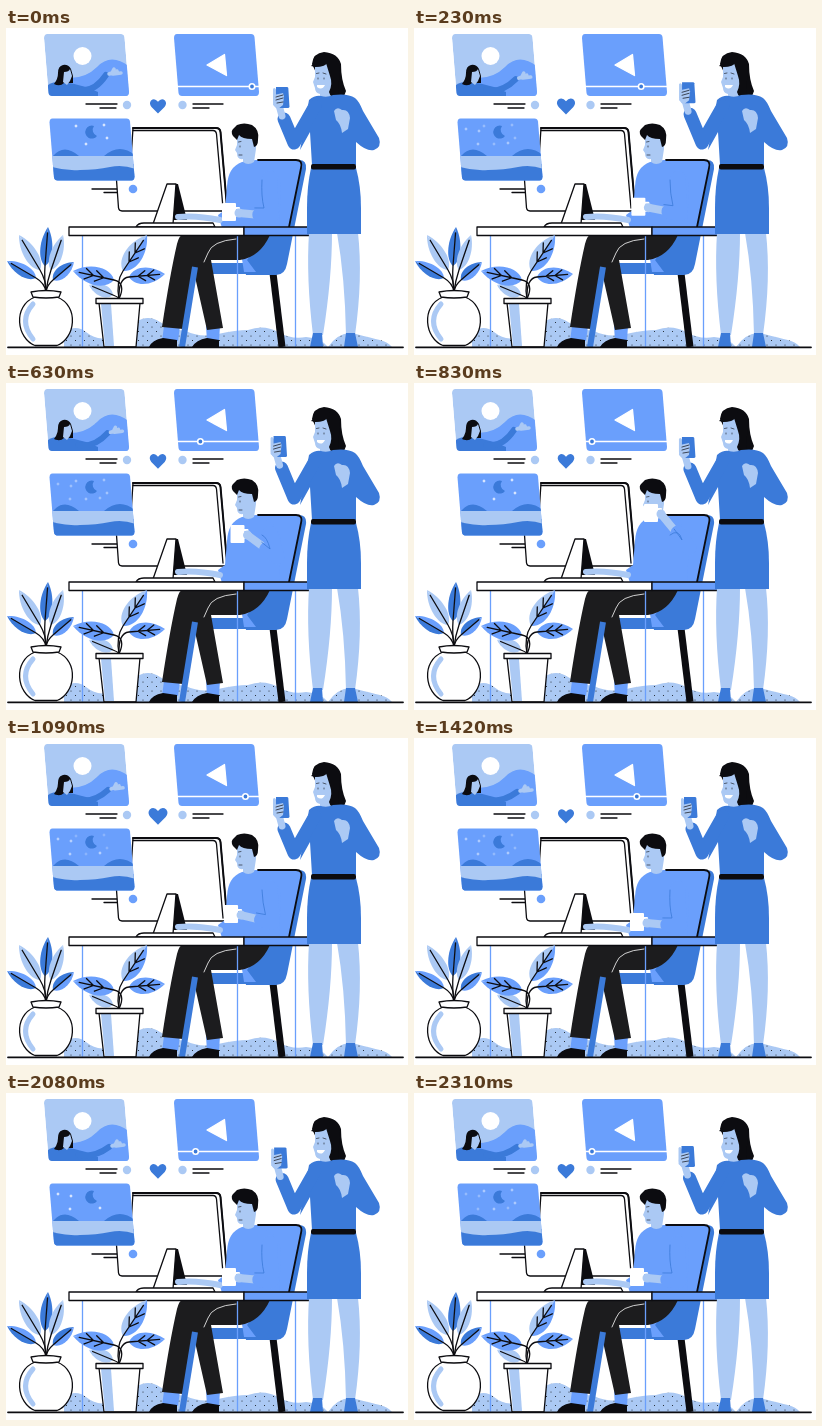
An HTML page that plays this animation: 402 by 327 pixels, repeating every 2.41 s.

```html
<!DOCTYPE html>
<html lang="en">
<head>
<meta charset="utf-8">
<title>Video call at the desk</title>
<style>
  html, body { margin: 0; width: 100%; height: 100%; overflow: hidden; background: #fff; }
  svg { display: block; width: 100vw; height: 100vh; stroke-width: 1.3; stroke-linecap: round; stroke-linejoin: round; }
  .l { fill: #abc9f4; }
  .m { fill: #6a9ffc; }
  .d { fill: #3b7ad9; }
  .k { fill: #0c0c10; }
  .w { fill: #fff; }
  .ink { fill: none; stroke: #0c0c10; }
  .box { fill: #fff; stroke: #0c0c10; }
  .desk { fill: #6a9ffc; stroke: #0c0c10; }
  .sl, .sm, .sd { fill: none; stroke: #abc9f4; }
  .sm { stroke: #6a9ffc; }
  .sd { stroke: #3b7ad9; }
</style>
</head>
<body>
<svg viewBox="0 0 402 327" preserveAspectRatio="none">
  <defs>
    <pattern id="dots" width="9" height="9" patternUnits="userSpaceOnUse">
      <circle cx="2" cy="2" r=".5"/><circle cx="6.500" cy="6.500" r=".5"/>
    </pattern>
    <path id="mounds" d="M58 319V304Q70 296 80 304T100 310L130 294Q142 286 154 294T180 303Q194 310 212 306T242 302Q258 296 272 304T300 309Q315 310 322 319ZM322 319Q334 302 350 306T374 312T386 319Z"/>
    <path id="card" d="M41 6H115Q118 6 118.500 9L123 64Q123 68 120 68H46Q43 68 42.500 65L38 10Q38 6 41 6Z"/>
    <clipPath id="clip"><use href="#card"/></clipPath>
    <clipPath id="clipLow"><use href="#card" transform="translate(5.500 84.500)"/></clipPath>
  </defs>

  <use href="#mounds" class="l"/>
  <use href="#mounds" fill="url(#dots)"/>

  <!-- portrait card -->
  <g clip-path="url(#clip)">
    <use href="#card" class="l"/>
    <circle class="w" cx="76.500" cy="28" r="9"/>
    <path class="m" d="M64 68V50Q80 50 91 39Q105 24 124 39V68Z"/>
    <path class="d" d="M40 68L42 57Q48 53 58 54Q70 56 80 59L92 64V68Z"/>
    <path class="sd" id="waveArm" stroke-width="6"/>
    <path class="sl" id="waveHand" stroke-width="3.500"/>
    <path class="k" d="M65 41Q62 36 57 37Q52 38 52 45Q52 51 48 56Q54 59 58 55H67V48Z"/>
    <path class="l" d="M58 44Q63 44 64 41L66 48L64 53L61 57L57 54Z"/>
  </g>

  <!-- player card -->
  <use href="#card" class="m" x="130"/>
  <path class="w" stroke="#fff" d="M201 37L218.500 26.500L220.500 47.500Z"/>
  <path stroke="#fff" d="M171.500 58.500H253"/>
  <circle id="knob" class="d" cy="58.500" r="2.700" stroke="#fff" stroke-width="1.600"/>

  <!-- captions -->
  <path class="ink" d="M80 76H111M94 80H110M187 76H217M187 80H203M86 161H117M98 164.500H117"/>
  <circle class="l" cx="121" cy="77" r="4.200"/>
  <circle class="l" cx="176.500" cy="77" r="4.200"/>
  <path class="d" id="heart" d="M0 8L-7 1Q-10 -3 -7.500 -6Q-3.500 -9 0 -4.500Q3.500 -9 7.500 -6Q10 -3 7 1Z"/>

  <!-- chair -->
  <path class="ink" stroke-width="7" stroke-linecap="butt" d="M267 245L276 319"/>
  <path class="d" d="M179 235H245V246H180Z"/>
  <path class="d" d="M250 132H293Q301 132 300 141L281 236Q279 247 270 247H240L232 205Z"/>
  <path class="m" d="M250 132H290Q297 132 295 140L283 199H250ZM232 205H262L241 232L250 244H238Z"/>
  <path class="ink" stroke-width="1.800" d="M252 132H290Q297 132 295 140L283 199"/>

  <!-- computer -->
  <path class="box" d="M127 100H210Q214 100 214.500 104L221 179Q221 183 217 183H116Q113 183 112.500 180L110 145L124 146Z"/>
  <path class="ink" stroke-width="2" d="M127 100H210Q214 100 214.500 104L221 179"/>
  <path class="ink" d="M127 102.500H207Q210 102.500 210.500 106L217 180"/>
  <path class="k" d="M169 156H172L181 192H166Z"/>
  <path class="box" d="M161 156H170L167 196H147Z"/>

  <!-- moonlit card -->
  <g clip-path="url(#clipLow)">
    <path class="m" d="M40 88H135V155H40Z"/>
    <path class="d" d="M47 128Q58 115 73 128ZM98 128Q114 114 130 128ZM46 136H135V155H46Z"/>
    <path class="l" d="M46 128H132V142Q118 136 104 139T74 142Q60 143 46 139Z"/>
    <path class="d" d="M88 98A6.500 6.500 0 1 0 91 108A6.500 6.500 0 0 1 88 98Z"/>
    <g id="stars" class="w"></g>
  </g>
  <circle class="m" cx="127" cy="161" r="4.300"/>

  <!-- seated man -->
  <path class="m" d="M236 134Q222 139 221 158L219 182L212 187L216 200H273L275 160Q274 143 262 138L250 132Z"/>
  <path class="sl" stroke-width="6" d="M172 189Q190 187 214 192"/>
  <path class="l" d="M231 106H250V121L248 134Q242 138 237 134V131Q231 132 231 125L229 122L231 117Z"/>
  <path class="k" d="M227 108Q224 103 228 100L231 97Q238 94 246 97Q254 102 252 112Q252 118 248 119L246 111Q236 111 233 107L231 112Z"/>
  <path class="ink" stroke-width=".6" d="M232.500 114L235 113.500M234 118V119M233 127H236"/>

  <!-- legs and shoes -->
  <path class="m" d="M158 298H174L172 313H156ZM200 298H214L213 313H201Z"/>
  <path class="k" d="M143 319Q146 312 157 310L171 312V319ZM186 319Q190 312 201 310L213 312V319Z"/>
  <path fill="#1c1c1e" d="M176 207H264Q254 229 234 232H205L217 300L201 302L187 240L177 301L156 299Q164 246 171 216Q173 208 176 207Z"/>
  <path class="sd" stroke-width="6" stroke-linecap="butt" d="M189 239L176 319"/>
  <path stroke="#fff" fill="none" stroke-width=".8" d="M230 211Q206 213 202 225L198 234"/>

  <!-- desk -->
  <path class="box" d="M130 199Q132 195 138 195H207L209 199Z"/>
  <path class="sm" d="M76.500 207V318M231.500 207V318M289.500 207V318"/>
  <path class="box" d="M63 199H238V207.500H63Z"/>
  <path class="desk" d="M238 199H305V207.500H238Z"/>

  <!-- drinking arm -->
  <path class="sl" id="forearm" stroke-width="8"/>
  <path class="sm" id="sleeve" stroke-width="15"/>
  <path class="sd" id="crease" stroke-width=".8"/>
  <g id="mug">
    <path class="sl" style="stroke:#fff" stroke-width="2" d="M5 -4H10V4H5"/>
    <rect class="w" x="-7" y="-9" width="14" height="18" rx="1"/>
  </g>
  <circle class="l" id="fist" r="4.500"/>

  <!-- standing woman -->
  <path class="l" d="M303 205H326Q326 250 317 307H307Q300 250 303 205ZM331 205H352Q357 250 349 307H340Q339 250 331 205Z"/>
  <path class="d" d="M307 305H316L317 319H304ZM340 305H349L352 319H338Z"/>
  <path class="k" d="M306 36Q307 25 318 24Q332 25 335 36Q335 52 340 63Q338 72 328 72L320 66Z"/>
  <path class="l" d="M309 39Q320 39 322 34L327 44V69Q320 74 314 69V66Q309 65 309 60L307 54L309 49Z"/>
  <path class="k" d="M305 38Q313 40 320 35L324 48Q327 56 323 64Q325 71 332 70L334 36L318 25Z"/>
  <path class="ink" stroke-width=".6" d="M310.500 45.500L313 45M317 45L320 46M312 50V51M318 50V51"/>
  <path class="w" d="M311 57H319Q316 63 311 59Z"/>
  <path class="d" d="M303 72Q309 67 315 68Q321 70 327 67Q342 65 349 70Q353 73 357 83L373 110Q376 119 368 122Q361 124 350 114V137H306L304 104L294 122Z"/>
  <path class="sd" id="phoneArm" stroke-width="13"/>
  <path class="l" d="M328 83Q331 78 336 82Q343 81 344 90L342 101L336 105Q335 96 330 92Z"/>
  <path class="d" d="M305 140Q301 158 301 180V206H355V180Q355 158 350 140Z"/>
  <rect class="k" x="305" y="136" width="45" height="5.500" rx="2"/>
  <path class="sl" id="wrist" stroke-width="7"/>
  <g id="phone">
    <path class="l" d="M-9 -8Q-7 -11 -5 -5L-3 12Q-8 12 -9 5Z"/>
    <path class="d" d="M-6 -10H5Q6 -10 6.300 -9L7.500 10Q7 11 6 11H-4Q-5.500 11 -6 9Z"/>
    <path class="l" d="M-8 -2L1 -4L2 -1L1 8L-4 12L-9 8Z"/>
    <path class="ink" stroke-width=".7" d="M-6 0L1 -2M-6 3L1 1M-5 6L1 5"/>
  </g>

  <!-- plants -->
  <g id="leaves"></g>
  <path class="box" d="M29 269C6 278 11 311 29 317.500H51C69 311 74 278 51 269Z"/>
  <path class="sl" stroke-width="5" d="M27 276Q12 293 27 311"/>
  <path class="box" d="M25 264Q40 261 55 264L53 269Q40 271 27 269Z"/>
  <path class="box" d="M93 275H134L130 319H98Z"/>
  <path class="l" d="M95 276H105L108 318H99Z"/>
  <path class="box" d="M90 270.500H137V275.500H90Z"/>

  <path class="ink" stroke-width="1.800" d="M2 319.300H397"/>
</svg>
<script>
const LOOP = 2410;
const STEPS = [0, 230, 330, 430, 630, 730, 830, 960, 1090, 1420, 1620, 1820, 1950, 2080, 2310];
const $ = id => document.getElementById(id);
const set = (id, attrs) => { for (const k in attrs) $(id).setAttribute(k, attrs[k]); };
const clamp = v => Math.max(0, Math.min(1, v));
const mix = (a, b, f) => a + (b - a) * f;
const swing = (t, period) => (1 - Math.cos(2 * Math.PI * t / period)) / 2;

// Stem from the root, then a blade of half-width w in two tones with a midrib and veins
function leaf(root, x, y, tx, ty, w, a, b = a, veins = 0) {
  const dx = tx - x, dy = ty - y, n = Math.hypot(dx, dy);
  const on = (f, s) => `${x + dx * f - dy / n * s} ${y + dy * f + dx / n * s}`;
  const half = (s, c) => `<path class="${c}" d="M${x} ${y}C${on(.15, s)} ${on(.65, s)} ${tx} ${ty}Z"/>`;
  let ribs = `M${root}Q${on(-.3, 0)} ${x} ${y}L${on(.85, 0)}`;
  for (let i = 1; i <= veins; i++) {
    const f = i / (veins + 2);
    ribs += `M${on(f + .2, w * .45)}L${on(f, 0)}L${on(f + .2, -w * .45)}`;
  }
  return half(-w, a) + half(w, b) + `<path class="ink" d="${ribs}"/>`;
}
const left = '40 264', right = '113 271';
$('leaves').innerHTML =
  leaf(left, 30, 250, 1, 233, 8, 'd', 'm') + leaf(left, 34, 242, 13, 207, 9, 'l') +
  leaf(left, 39, 238, 42, 199, 8, 'd') + leaf(left, 45, 242, 57, 207, 8, 'l') +
  leaf(left, 47, 252, 68, 234, 8, 'd', 'm') +
  leaf(right, 107, 267, 83, 257, 8, 'l') + leaf(right, 108, 252, 67, 243, 12, 'm', 'm', 2) +
  leaf(right, 117, 243, 141, 207, 12, 'l', 'm', 2) + leaf(right, 123, 249, 159, 246, 11, 'm', 'm', 2);

// Stars alternate between two phases of the twinkle
const SKY = [[98, 97], [52, 101], [101, 110], [65, 103], [80, 116], [64, 116], [70, 98], [94, 115]];
$('stars').innerHTML = SKY.map(([x, y]) =>
  `<path d="M${x} ${y - 2}l.6 1.400 1.400 .6-1.400 .6-.6 1.400-.6-1.400-1.400-.6 1.400-.6Z"/>`).join('');

function draw(ms) {
  const t = STEPS.filter(s => s <= ms).pop();

  // The playhead runs back twice, quickly and then slowly
  const run = t < 960 ? t / 830 : (t - 960) / 1350;
  set('knob', { cx: mix(246, 178, clamp(run)) });

  // One sip: up until 830 ms, down by 1420 ms
  const sip = t < 830 ? (t / 830) ** 1.8 : clamp((1420 - t) / 590) ** 3.3;
  const mx = mix(223, 237, sip), my = mix(184, 130, sip);
  const hx = mx + 10, hy = my + 1;
  const ex = mix(265, 275, sip), ey = mix(188, 165, sip);
  const cx = mix(ex, hx, .35), cy = mix(ey, hy, .35);
  set('mug', { transform: `translate(${mx} ${my})` });
  set('fist', { cx: hx, cy: hy });
  set('forearm', { d: `M${ex} ${ey}L${hx} ${hy}` });
  set('sleeve', { d: `M264 150L${ex} ${ey}L${cx} ${cy}` });
  set('crease', { d: `M256 152Q${ex - 10} ${ey - 20} ${ex - 7} ${ey - 8}L${cx - 5} ${cy - 7}` });

  // The phone is lifted and lowered, then slowly lifted again
  const lift = t < 1090 ? Math.sqrt(Math.sin(Math.PI * t / 1090)) : clamp((t - 1420) / 890);
  const px = mix(276, 273.5, lift), py = mix(69, 63, lift);
  set('phone', { transform: `translate(${px} ${py})` });
  set('wrist', { d: `M${px - 3} ${py + 8}L${px} ${py + 19}` });
  set('phoneArm', { d: `M309 78L288 115L${px + 2} ${py + 22}` });

  const wave = swing(Math.min(t, 1245), 830);
  const wx = mix(103, 106, wave), wy = mix(46, 53, wave);
  set('waveArm', { d: `M72 62Q88 65 ${wx - 3} ${wy + 1}` });
  set('waveHand', { d: `M${wx} ${wy}l8 -3M${wx + 3} ${wy - 1}l2 -4M${wx + 4} ${wy}l8 -1` });

  const glow = swing(t, 830);
  [...$('stars').children].forEach((s, i) => s.setAttribute('opacity', i % 2 ? glow : 1 - glow));
  set('heart', { transform: `translate(152 78) scale(${mix(.93, 1.1, swing(t - 725, 730))})` });
}

const start = performance.now();
function tick() {
  draw((performance.now() - start) % LOOP);
  requestAnimationFrame(tick);
}
tick();
</script>
</body>
</html>
```
